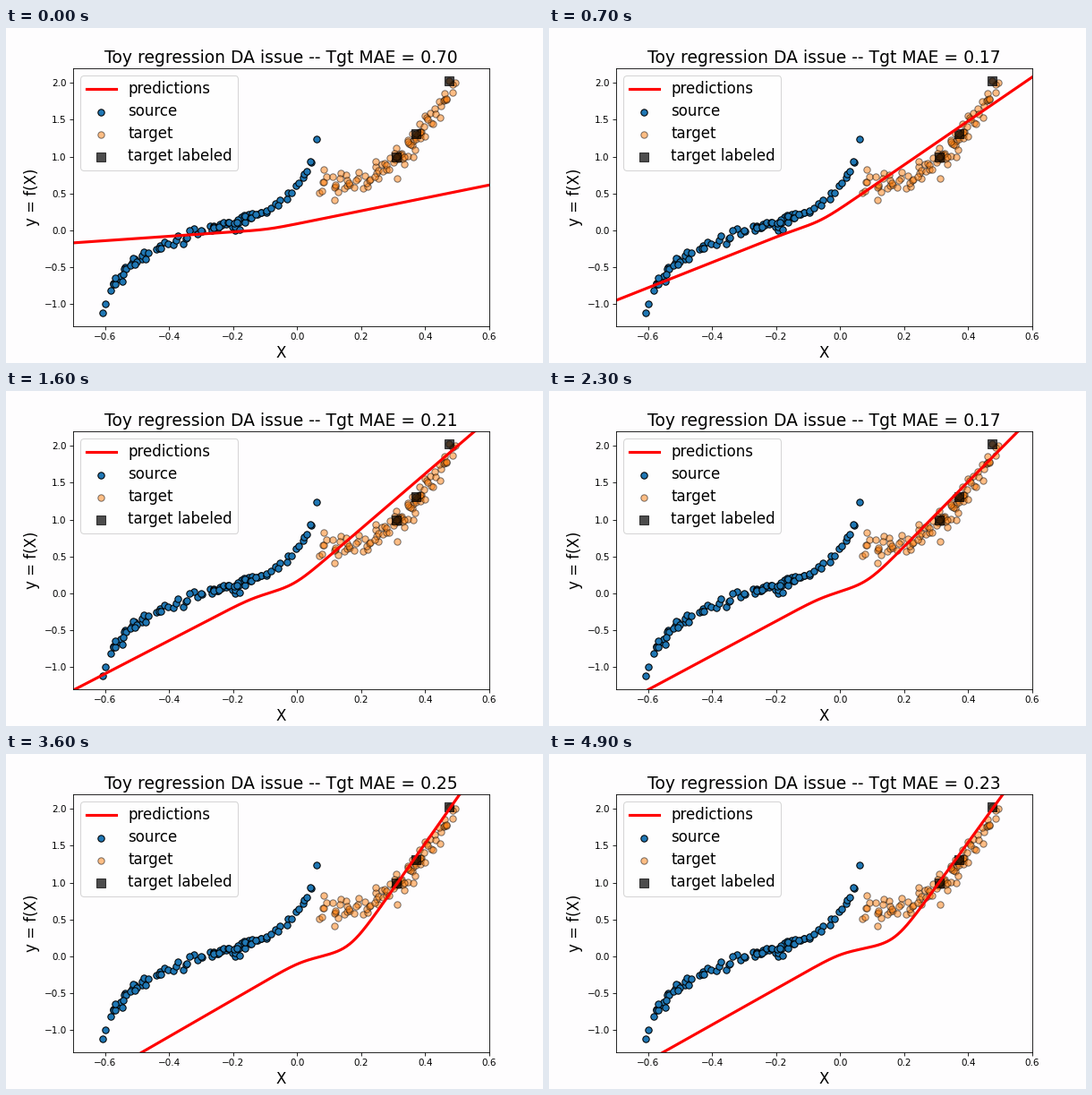
Animation of 600 by 374 pixels, one loop 5 s. Source, as a matplotlib script:

```python
import numpy as np
import matplotlib.pyplot as plt
from matplotlib.animation import FuncAnimation

WIDTH, HEIGHT, DPI = 600, 374, 75
FRAMES, INTERVAL = 50, 100
X_MIN, X_MAX, Y_MIN, Y_MAX = -0.7, 0.6, -1.3, 2.2
BEND_WIDTH = 0.025
PAPER = "#fefdfe"

plt.rcParams["font.family"] = "DejaVu Sans"
rng = np.random.default_rng(4)


def spread(start, stop, count, jitter=0.008):
    """Roughly even positions that stay within the interval."""
    x = np.linspace(start, stop, count) + rng.normal(0, jitter, count)
    return np.clip(x, start, stop)


def source_curve(x):
    return 0.34 * np.tan(3.85 * (x + 0.277)) - 0.01


def target_curve(x):
    return 0.58 + 10.5 * x ** 2.78


source_x = np.concatenate([spread(-0.608, 0.06, 68), spread(-0.57, -0.5, 9),
                           spread(-0.26, -0.13, 18)])
source_y = source_curve(source_x) + rng.normal(0, 0.04, source_x.size)

labeled_x = np.array([0.309, 0.371, 0.474])
labeled_y = np.array([1.0, 1.31, 2.03])
target_x = np.concatenate([spread(0.07, 0.495, 80), spread(0.3, 0.4, 18)])
target_y = target_curve(target_x) + rng.normal(0, 0.09, target_x.size)
target_x = np.append(target_x, labeled_x)
target_y = np.append(target_y, labeled_y)

# Each pose: left height, two elbows (x, y), right height, error.
STEEPEST = (-1.84, 0.01, -0.06, 0.165, 0.08, 2.77, 0.25)
POSES = {
    0: (-0.17, -0.16, -0.01, -0.09, 0.01, 0.615, 0.70),
    7: (-0.95, -0.16, -0.02, -0.06, 0.115, 2.08, 0.17),
    16: (-1.315, -0.14, -0.055, -0.01, 0.095, 2.37, 0.21),
    23: (-1.54, -0.06, -0.05, 0.085, 0.13, 2.395, 0.17),
    36: STEEPEST,
    41: STEEPEST,
    49: (-1.66, 0.0, 0.05, 0.172, 0.18, 2.75, 0.23),
}


def pose_at(frame):
    return [np.interp(frame, list(POSES), values)
            for values in zip(*POSES.values())]


def rounded_line(x, left, x1, y1, x2, y2, right):
    """Three straight runs joined by soft elbows."""
    slopes = np.diff([left, y1, y2, right]) / np.diff([X_MIN, x1, x2, X_MAX])
    y = left + slopes[0] * (x - X_MIN)
    for elbow, change in zip((x1, x2), np.diff(slopes)):
        y += change * BEND_WIDTH * np.logaddexp(0, (x - elbow) / BEND_WIDTH)
    return y


fig, ax = plt.subplots(figsize=(WIDTH / DPI, (HEIGHT + 0.01) / DPI), dpi=DPI,
                       facecolor=PAPER)
ax.set_facecolor(PAPER)
grid = np.linspace(X_MIN, X_MAX, 400)
line, = ax.plot(grid, grid, color="red", lw=3, label="predictions")
ax.scatter(source_x, source_y, s=50, color="C0", edgecolor="black",
           label="source")
ax.scatter(target_x, target_y, s=50, color="C1", edgecolor="black", alpha=0.5,
           label="target")
ax.scatter(labeled_x, labeled_y, s=100, color="black", marker="s", alpha=0.7,
           edgecolor="black", label="target labeled")
ax.set_xlim(X_MIN, X_MAX)
ax.set_ylim(Y_MIN, Y_MAX)
ax.set_xlabel("X", fontsize=16)
ax.set_ylabel("y = f(X)", fontsize=16)
ax.legend(loc="upper left", fontsize=16, labelspacing=0.42, borderpad=0.37)
title = ax.set_title("", fontsize=18)


def update(frame):
    *shape, error = pose_at(frame)
    line.set_ydata(rounded_line(grid, *shape))
    title.set_text(f"Toy regression DA issue -- Tgt MAE = {error:.2f}")
    return line, title


animation = FuncAnimation(fig, update, frames=FRAMES, interval=INTERVAL,
                          repeat=True, repeat_delay=0)
plt.show()
```
